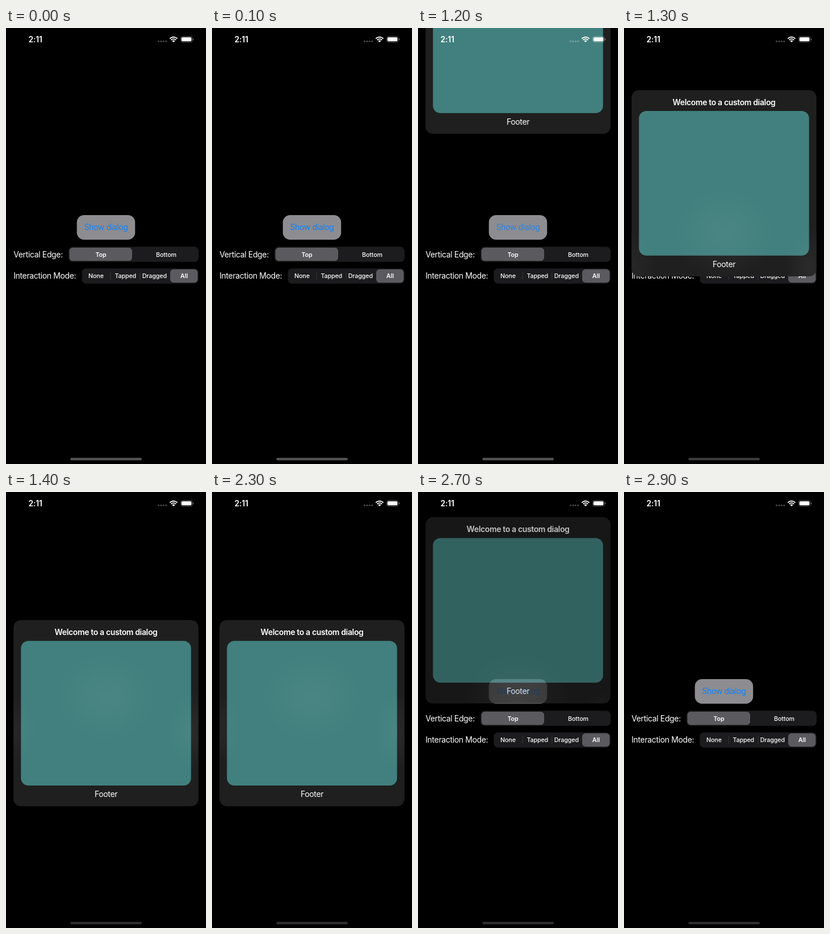
Animation, 352 px wide and 762 px high, one loop 3000 ms. Source, as an HTML page with a canvas:

```html
<!DOCTYPE html>
<html lang="en">
<head>
<meta charset="utf-8">
<title>Custom dialog</title>
<style>
html, body { margin: 0; width: 100%; height: 100%; overflow: hidden; background: #000; }
canvas { display: block; width: 352px; height: 762px; }
</style>
</head>
<body>
<canvas id="stage"></canvas>
<script>
const W = 352, H = 762, LOOP = 3000, STEP = 100;
const dpr = window.devicePixelRatio || 1;
const stage = document.getElementById('stage');
const layer = document.createElement('canvas');
const FONT = 'Inter, "Liberation Sans", sans-serif';

function prepare(canvas) {
  canvas.width = W * dpr;
  canvas.height = H * dpr;
  const c = canvas.getContext('2d');
  c.scale(dpr, dpr);
  return c;
}
const ctx = prepare(stage);
const dlg = prepare(layer);

function box(c, x, y, w, h, r, fill) {
  c.beginPath();
  c.roundRect(x, y, w, h, r);
  c.fillStyle = fill;
  c.fill();
}

function text(c, str, x, y, { size = 14, weight = 400, align = 'center', color = '#fff', track = -0.36 } = {}) {
  c.font = `${weight} ${size}px ${FONT}`;
  c.letterSpacing = track + 'px';
  c.textAlign = align;
  c.fillStyle = color;
  c.fillText(str, x, y);
}

function label(str, x, y, weight = 500) {
  text(ctx, str, x, y, { size: 10.7, weight, track: -0.12 });
}

function glow(c, x, y, rx, ry, alpha) {
  c.save();
  c.translate(x, y);
  c.scale(rx, ry);
  const g = c.createRadialGradient(0, 0, 0, 0, 0, 1);
  g.addColorStop(0, `rgba(255,255,255,${alpha})`);
  g.addColorStop(0.5, `rgba(255,255,255,${alpha * 0.55})`);
  g.addColorStop(1, 'rgba(255,255,255,0)');
  c.fillStyle = g;
  c.fillRect(-1, -1, 2, 2);
  c.restore();
}

// Light of the blurred controls behind the dialog
function backlight(k) {
  glow(dlg, 176, 358, 92, 80, 0.06 * k);
  glow(dlg, 325, 418, 42, 70, 0.05 * k);
  glow(dlg, 16, 415, 40, 60, 0.035 * k);
}

function controls(ink) {
  box(ctx, 124.7, 327, 102.5, 43, 12.5, '#8c8c91');
  ctx.globalAlpha = ink;
  text(ctx, 'Show dialog', 176, 353.3, { color: '#0f82fb' });
  ctx.globalAlpha = 1;

  text(ctx, 'Vertical Edge:', 13.2, 400.5, { align: 'left' });
  box(ctx, 110, 382.3, 229, 26.5, 7.3, '#1c1c1e');
  box(ctx, 111.6, 384, 110.4, 23, 5.7, '#5b5b5f');
  label('Top', 167, 399.5, 600);
  label('Bottom', 282, 399.5);

  text(ctx, 'Interaction Mode:', 13.2, 438.3, { align: 'left' });
  box(ctx, 133.5, 420.2, 205.3, 26.5, 7.3, '#1c1c1e');
  box(ctx, 289, 421.8, 48.3, 23.2, 5.7, '#5b5b5f');
  box(ctx, 183.6, 427, 0.9, 13, 0, '#3b3b3e');
  box(ctx, 235.4, 427, 0.9, 13, 0, '#3b3b3e');
  label('None', 158.4, 437.3);
  label('Tapped', 210.2, 437.3);
  label('Dragged', 261.3, 437.3);
  label('All', 313.3, 437.3, 600);
}

function dialog(dy, alpha) {
  dlg.clearRect(0, 0, W, H);
  dlg.save();
  box(dlg, 13.2, 223.7 + dy, 325.6, 325.6, 13, '#1f1f1f');
  dlg.clip();
  backlight(1);
  dlg.save();
  box(dlg, 26.3, 260.3 + dy, 299.4, 252.8, 13, '#41807e');
  dlg.clip();
  backlight(0.75);
  dlg.restore();
  text(dlg, 'Welcome to a custom dialog', 176, 250 + dy, { weight: 600 });
  text(dlg, 'Footer', 176, 533 + dy);
  dlg.restore();

  ctx.globalAlpha = alpha;
  ctx.drawImage(layer, 0, 0, W, H);
  ctx.globalAlpha = 1;
}

function statusBar() {
  text(ctx, '2:11', 51.5, 24.8, { weight: 600, track: -0.2 });
  for (let i = 0; i < 4; i++) {
    box(ctx, 267 + i * 4.4, 21.8, 3.1, 3.1, 1.55, 'rgba(255,255,255,0.28)');
  }

  // Wi-Fi fan
  ctx.save();
  ctx.beginPath();
  ctx.moveTo(294.9, 25);
  ctx.arc(294.9, 25, 10.2, -Math.PI * 0.76, -Math.PI * 0.24);
  ctx.clip();
  ctx.strokeStyle = ctx.fillStyle = '#fff';
  ctx.lineWidth = 1.9;
  for (const r of [9.2, 5.9]) {
    ctx.beginPath();
    ctx.arc(294.9, 25, r, 0, Math.PI * 2);
    ctx.stroke();
  }
  ctx.beginPath();
  ctx.arc(294.9, 25, 3.4, 0, Math.PI * 2);
  ctx.fill();
  ctx.restore();

  // Battery
  ctx.beginPath();
  ctx.roundRect(307.4, 14.9, 20.6, 9.8, 3.2);
  ctx.strokeStyle = 'rgba(255,255,255,0.4)';
  ctx.lineWidth = 0.9;
  ctx.stroke();
  box(ctx, 308.8, 16.3, 17.6, 7, 2, '#fff');
  box(ctx, 329, 18.2, 1.1, 3.3, [0, 1, 1, 0], 'rgba(255,255,255,0.45)');
}

function pose(t) {
  if (t < 1200) return null;
  if (t < 2600) {
    const p = Math.min(1, (t - 1070) / 330);
    return { dy: -549 * (1 + Math.cos(Math.PI * p)) / 2, alpha: 1 };
  }
  const p = ((t - 2500) / 415) ** 2;
  return p < 0.75 ? { dy: -774 * p, alpha: 1 - p } : null;
}

function draw(now) {
  const t = Math.floor((now % LOOP) / STEP) * STEP;
  const ink = t < 1000 || t >= 1300 ? 1 : t < 1200 ? 0.45 : 0.82;
  const home = t < 1300 ? '#555' : t < 1400 ? '#3c3c3c' : '#303030';

  ctx.fillStyle = '#000';
  ctx.fillRect(0, 0, W, H);
  controls(ink);
  box(ctx, 113.2, 751.3, 125.8, 4.2, 2.1, home);
  const at = pose(t);
  if (at) dialog(at.dy, at.alpha);
  statusBar();
  requestAnimationFrame(draw);
}
requestAnimationFrame(draw);
</script>
</body>
</html>
```
